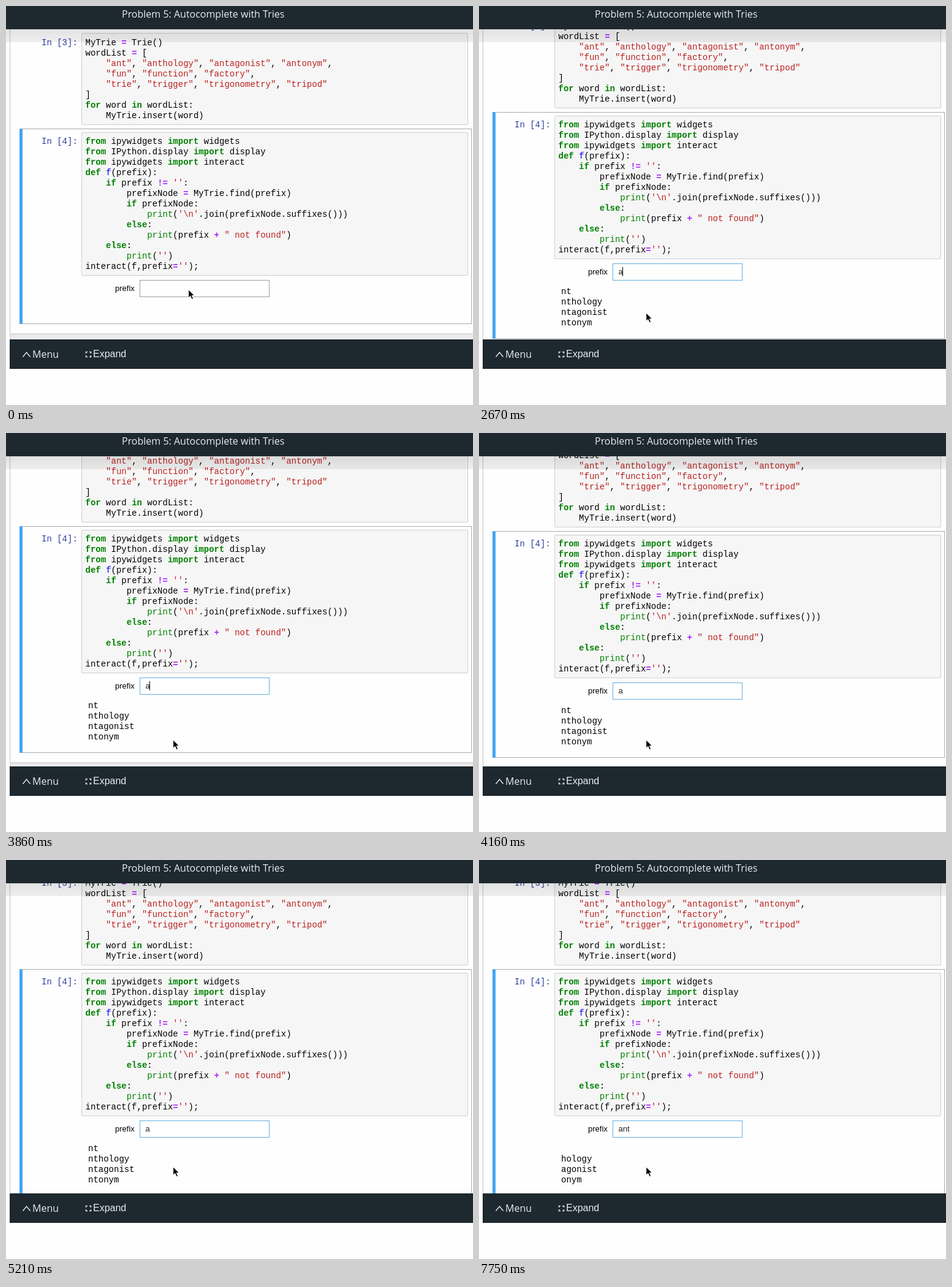
Write an HTML page that moves like this. It is 762 px wide and 651 px high and loops after 8000 ms.

```html
<!DOCTYPE html>
<html lang="en">
<head>
<meta charset="utf-8">
<title>Autocomplete with Tries</title>
<style>
html, body { margin: 0; width: 100%; height: 100%; overflow: hidden; background: #fefefe; }
#stage { position: relative; width: 762px; height: 651px; overflow: hidden; }
#stage div, pre, svg { position: absolute; box-sizing: border-box; margin: 0; }
pre, .prompt { font: 14px/17px "Liberation Mono", "Courier New", monospace; color: #000; white-space: pre; }
b { color: #008000; }
i { color: #a2f; font-style: normal; font-weight: bold; }
q { color: #ba2121; quotes: none; }
u { color: #008000; text-decoration: none; }
em { color: #00f; font-style: normal; }

/* everything that changes shares one stepped clock */
.sheet, .code, .cell, .field, .caret, .arrow, #scroll, .t, pre.out {
  animation: 8s step-end infinite;
}

#page { left: 6px; top: 0; width: 756px; height: 544px; background: #ebebeb; border-left: 1px solid #d4d4d4; }
#scroll { left: 0; top: 0; width: 762px; height: 651px; animation-name: scroll; }
.sheet { left: 7px; top: 0; width: 755px; height: 534px; background: #fefefe; box-shadow: 0 1px 3px #0002; animation-name: grow-sheet, tint-sheet; }
.cell { left: 22px; top: 200px; width: 738px; height: 319px; border: 1px solid #ababab; border-left: 5px solid #42a5f5; animation-name: grow-cell; }
.code { left: 123px; width: 631px; background: #f6f6f6; border: 1px solid #cfcfcf; border-radius: 2px; animation-name: tint-code; }
.code pre { left: 5.5px; top: 7px; }
.prompt { left: 58px; color: #303f9f; }

.ui { font: 13px/16px "Liberation Sans", Arial, sans-serif; color: #000; white-space: pre; }
.field { left: 218px; top: 447px; width: 212px; height: 28px; background: #fff; border: 1px solid #9e9e9e; animation-name: focus; }
.typed { left: 227.5px; top: 453px; color: #222; }
.t { visibility: hidden; }
.caret { left: 228px; top: 453px; width: 1px; height: 15px; background: #000; animation-name: caret; }
.out { left: 134px; top: 485px; visibility: hidden; }

#head { left: 0; top: 0; width: 762px; height: 38px; background: #1e282f; }
#shade { left: 0; top: 38px; width: 762px; height: 21px; background: linear-gradient(#0000001c, #0000000f); }
#foot { left: 0; top: 544px; width: 762px; height: 107px; background: #fefefe; }
#bar { left: 6px; top: 0; width: 756px; height: 48px; background: #1e282f; border: solid #141c22; border-width: 1px 0; }
.light { font: 16px/22px "Open Sans", sans-serif; color: #e9ecee; white-space: pre; }
.arrow { left: 297px; top: 462px; animation-name: move, blink; }

@keyframes scroll {
  0% { transform: none; }
  33.375% { transform: translateY(-27px); }
  35.25% { transform: translateY(-43px); }
  37.125% { transform: translateY(-50px); }
  46.5% { transform: translateY(-48px); }
  48.375% { transform: translateY(-45px); }
  50.25% { transform: translateY(-42px); }
  52% { transform: translateY(-40px); }
  57.625% { transform: translateY(-35px); }
  59.5% { transform: translateY(-30px); }
  63.25% { transform: translateY(-25px); }
  65.125% { transform: translateY(-22px); }
}
@keyframes grow-sheet { 0% { height: 534px; } 13% { height: 585px; } }
@keyframes grow-cell { 0% { height: 319px; } 13% { height: 370px; } }
@keyframes tint-sheet { 0%, 46.5% { background: #fefefe; } 37.125% { background: #fafafa; } }
@keyframes tint-code { 0%, 46.5% { background: #f6f6f6; } 37.125% { background: #fafafa; } }
@keyframes focus { 0% { border-color: #9e9e9e; } 1.75% { border-color: #66afe0; } }
@keyframes caret {
  0% { opacity: 0; transform: none; }
  7.375% { transform: translateX(6px); }
  83.875% { transform: translateX(13px); }
  91.25% { transform: translateX(17px); }
  1.75%, 22.25%, 33.375%, 46.5%, 57.625%, 70.75%, 83.875% { opacity: 1; }
  14.75%, 27.875%, 40.875%, 52%, 63.25%, 78.25%, 96.875% { opacity: 0; }
}
@keyframes key-a { 0% { visibility: hidden; } 7.375% { visibility: visible; } }
@keyframes key-n { 0% { visibility: hidden; } 83.875% { visibility: visible; } }
@keyframes key-t { 0% { visibility: hidden; } 91.25% { visibility: visible; } }
@keyframes out-a { 0%, 89.375% { visibility: hidden; } 13% { visibility: visible; } }
@keyframes out-an { 0%, 93.125% { visibility: hidden; } 89.375% { visibility: visible; } }
@keyframes out-ant { 0% { visibility: hidden; } 93.125% { visibility: visible; } }
@keyframes move {
  0% { transform: none; }
  22.25% { transform: translate(-4px, 8px); }
  24.125% { transform: translate(-14px, 24px); }
  26% { transform: translate(-22px, 35px); }
  27.875% { transform: translate(-25px, 38px); }
}
/* the pointer hides for a moment after a key press */
@keyframes blink {
  0%, 9.25%, 85.75% { visibility: visible; }
  7.375%, 83.875% { visibility: hidden; }
}
</style>
</head>
<body>
<div id="stage">
  <div id="page"></div>
  <div id="scroll">
    <div class="sheet"></div>

    <div class="prompt" style="top:52px">In [3]:</div>
    <div class="code" style="top:44px;height:150px"><pre>MyTrie <i>=</i> Trie()
wordList <i>=</i> [
    <q>"ant"</q>, <q>"anthology"</q>, <q>"antagonist"</q>, <q>"antonym"</q>,
    <q>"fun"</q>, <q>"function"</q>, <q>"factory"</q>,
    <q>"trie"</q>, <q>"trigger"</q>, <q>"trigonometry"</q>, <q>"tripod"</q>
]
<b>for</b> word <b>in</b> wordList:
    MyTrie.insert(word)</pre></div>

    <div class="cell"></div>
    <div class="prompt" style="top:213px">In [4]:</div>
    <div class="code" style="top:206px;height:234px"><pre style="top:6px"><b>from</b> ipywidgets <b>import</b> widgets
<b>from</b> IPython.display <b>import</b> display
<b>from</b> ipywidgets <b>import</b> interact
<b>def</b> <em>f</em>(prefix):
    <b>if</b> prefix <i>!=</i> <q>''</q>:
        prefixNode <i>=</i> MyTrie.find(prefix)
        <b>if</b> prefixNode:
            <u>print</u>(<q>'\n'</q>.join(prefixNode.suffixes()))
        <b>else</b>:
            <u>print</u>(prefix <i>+</i> <q>" not found"</q>)
    <b>else</b>:
        <u>print</u>(<q>''</q>)
interact(f,prefix<i>=</i><q>''</q>);</pre></div>

    <div class="ui" style="left:178px;top:453px">prefix</div>
    <div class="field"></div>
    <div class="ui typed"><span class="t" style="animation-name:key-a">a</span><span class="t" style="animation-name:key-n">n</span><span class="t" style="animation-name:key-t">t</span></div>
    <div class="caret"></div>

    <pre class="out" style="animation-name:out-a">nt
nthology
ntagonist
ntonym</pre>
    <pre class="out" style="animation-name:out-an">t
thology
tagonist
tonym</pre>
    <pre class="out" style="animation-name:out-ant"> 
hology
agonist
onym</pre>
  </div>

  <div id="shade"></div>
  <div id="head"><div class="light" style="left:189px;top:2px">Problem 5: Autocomplete with Tries</div></div>
  <div id="foot">
    <div id="bar"></div>
    <svg width="150" height="48" fill="none" stroke="#e9ecee" stroke-width="1.4">
      <path d="M27.5 28.5L33.5 21L39.5 28.5"/>
      <path d="M133 20.5H130.5V23M136 20.5H138.5V23M130.5 26V28.5H133M138.5 26V28.5H136"/>
    </svg>
    <div class="light" style="left:43px;top:13px">Menu</div>
    <div class="light" style="left:142px;top:13px;font-family:'Liberation Sans',Arial,sans-serif">Expand</div>
  </div>

  <svg class="arrow" width="14" height="19">
    <path d="M.7 .8V14.2L3.8 11.3L6.2 16.6L8.6 15.6L6.3 10.4H10.4Z" fill="#000" stroke="#fff" stroke-width="1"/>
  </svg>
</div>
</body>
</html>
```
